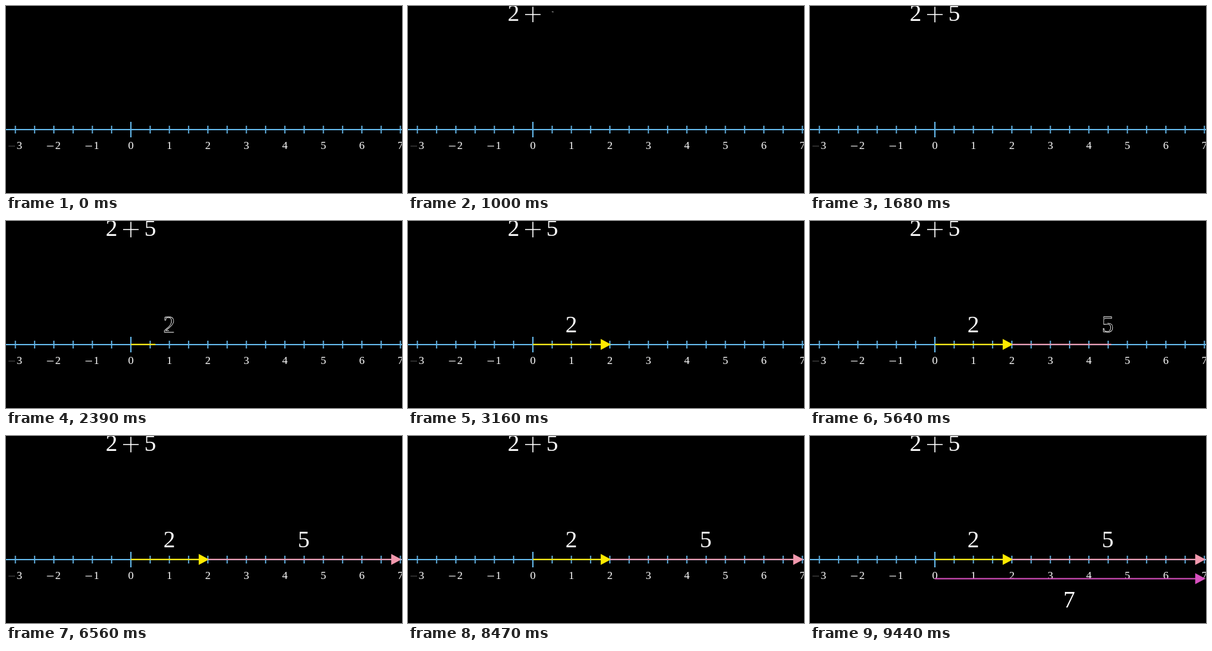
These frames come from a looping animation (612 px wide and 289 px high, 9520 ms). An HTML page:

```html
<!DOCTYPE html>
<html lang="en">
<head>
<meta charset="utf-8">
<title>Addition on a number line</title>
<style>
  html, body { margin: 0; width: 100%; height: 100%; overflow: hidden; background: #000; }
  svg { display: block; width: 612px; height: 289px; }
  text { font-family: "Liberation Serif", "Times New Roman", serif; text-anchor: middle; fill: #fff; }
  .label { font-size: 17px; }
  .big { font-size: 36.5px; }
  .sign { stroke: #fff; fill: none; }
</style>
</head>
<body>
<svg id="stage" viewBox="0 0 612 289"></svg>
<script>
const LOOP = 9520, RUN = 970;
const ORIGIN = 193, UNIT = 59.5, AXIS_Y = 191, BLUE = '#62b4e6';
const stage = document.getElementById('stage');

const add = (tag, attrs, content = '') => {
  const el = document.createElementNS('http://www.w3.org/2000/svg', tag);
  for (const key in attrs) el.setAttribute(key, attrs[key]);
  el.textContent = content;
  return stage.appendChild(el);
};
const clamp = v => Math.min(1, Math.max(0, v));
const sigmoid = v => 1 / (1 + Math.exp(-v));
const smooth = v => {
  const edge = sigmoid(-5);
  return clamp((sigmoid(10 * (clamp(v) - 0.5)) - edge) / (1 - 2 * edge));
};
const toX = n => ORIGIN + n * UNIT;

function drawNumberLine() {
  const line = (d, width) => add('path', { d, stroke: BLUE, 'stroke-width': width });
  line(`M0 ${AXIS_Y}H612`, 2);
  for (let n = -3; n <= 7; n += 0.5) {
    const half = n === 0 ? 12 : 6;
    line(`M${toX(n)} ${AXIS_Y - half}v${2 * half}`, n === 0 ? 2 : 1.8);
  }
  for (let n = -3; n <= 7; n++) {
    const x = toX(n), negative = n < 0;
    add('text', { class: 'label', x: x + (negative ? 6.2 : 0), y: 220.7 }, Math.abs(n));
    if (negative) {
      add('path', { class: 'sign', d: `M${x - 10.7} 216.5h10.2`, 'stroke-width': 1, opacity: n === -3 ? 0.3 : 1 });
    }
  }
}

// The outline is traced first, then the inside fades in.
function written(el, length, solid) {
  return p => {
    const border = smooth(2 * p), fill = smooth(2 * p - 1);
    el.style.visibility = p > 0 ? 'visible' : 'hidden';
    el.style.strokeDasharray = border < 1 ? `${length * border} ${length * 2}` : 'none';
    if (solid) return;
    el.style.stroke = '#fff';
    el.style.strokeWidth = 0.8;
    el.style.strokeOpacity = 1 - fill;
    el.style.fillOpacity = fill;
  };
}
const digit = (char, x, y) => written(add('text', { class: 'big', x, y }, char), 110, false);
const plus = (x, y) => written(add('path', {
  class: 'sign', d: `M${x - 12} ${y}h24M${x} ${y - 12}v24`, 'stroke-width': 1.6
}), 24, true);

// The shaft grows first, then the head is traced corner by corner.
function arrow(from, to, y, color) {
  const start = toX(from), end = toX(to) + 1.8, base = end - 16;
  const shaft = add('path', { stroke: color, 'stroke-width': 2 });
  const head = add('polygon', { fill: color });
  const corners = [[base, y - 8.5], [end, y], [base, y + 8.5], [base, y - 8.5]];
  return p => {
    const a = smooth(p), grow = clamp(2 * a), trace = 3 * clamp(2 * a - 1);
    shaft.setAttribute('d', grow > 0 ? `M${start} ${y}H${start + (base + 1 - start) * grow}` : '');
    const whole = Math.min(2, Math.floor(trace)), part = trace - whole;
    const [p0, p1] = [corners[whole], corners[whole + 1]];
    const tip = p0.map((v, i) => v + (p1[i] - v) * part);
    head.setAttribute('points', trace > 0 ? [...corners.slice(0, whole + 1), tip].join(' ') : '');
  };
}

drawNumberLine();

const sum = [digit('2', 163, 22.7), plus(193, 13.2), digit('5', 222.8, 22.7)];
const writeSum = p => sum.forEach((part, i) => part(clamp(p * 1.8 - i * 0.4)));

const steps = [
  [530, writeSum],
  [2050, arrow(0, 2, 190.7, '#ffea00')],
  [2050, digit('2', 252.3, 171.7)],
  [5250, arrow(2, 7, 190.7, '#f299ae')],
  [5250, digit('5', 460, 171.5)],
  [8475, arrow(0, 7, 220.5, '#d950c0')],
  [8475, digit('7', 400.5, 265)]
];

let began;
function render(now) {
  began ??= now;
  const t = (now - began) % LOOP;
  for (const [start, show] of steps) show(clamp((t - start) / RUN));
  requestAnimationFrame(render);
}
requestAnimationFrame(render);
</script>
</body>
</html>
```
